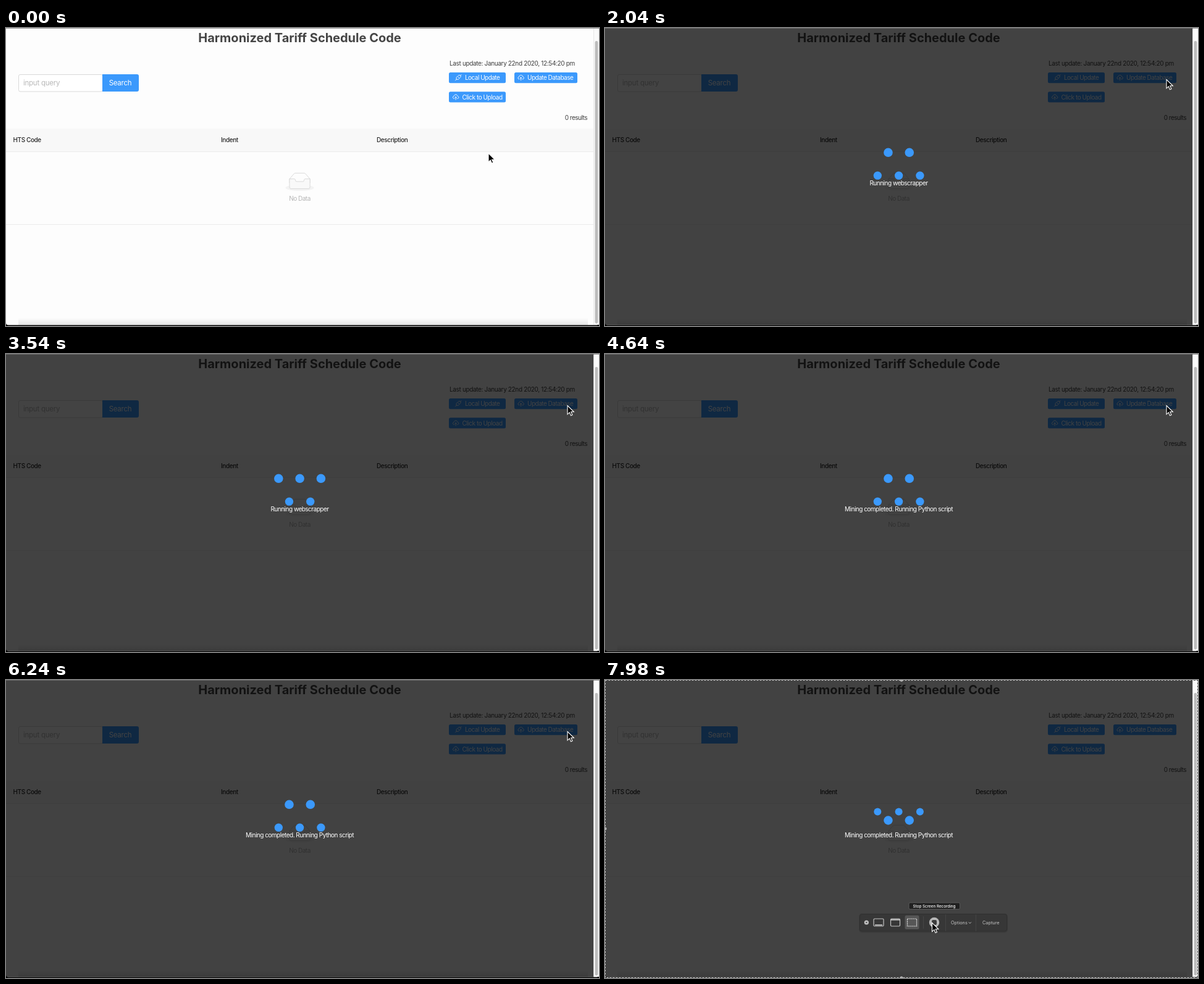
These frames come from a looping animation (960x483 px, 8000 ms). An HTML page:

```html
<!DOCTYPE html>
<html lang="en">
<head>
<meta charset="utf-8">
<title>Tariff schedule search</title>
<style>
  html, body { margin: 0; width: 100%; height: 100%; overflow: hidden; background: #fdfdfd; }
  svg { display: block; width: 100%; height: 100%; }
  text { font: 10px Inter, "Open Sans", sans-serif; letter-spacing: -.5px; fill: #3d3d3d; white-space: pre; }
  .title { font-size: 20px; font-weight: 700; letter-spacing: 0; fill: #454545; }
  .head { font-weight: 500; letter-spacing: -.4px; fill: #262626; }
  .field { font-size: 11.5px; letter-spacing: -.25px; fill: #b9b9b9; }
  .white, .button text { fill: #fff; }
  .button rect { fill: #3b99fc; }
  .icon { fill: none; stroke: #fff; stroke-width: .9; stroke-linecap: round; stroke-linejoin: round; }
  .middle { text-anchor: middle; }
  .end { text-anchor: end; }
  .bar text { font-size: 7.3px; letter-spacing: 0; fill: #c4c4c4; }
  .bar .tip { font-size: 6.3px; font-weight: 500; fill: #fff; }
</style>
</head>
<body>
<svg viewBox="0 0 960 483" preserveAspectRatio="none">
  <defs>
    <linearGradient id="shade" x2="0" y2="1">
      <stop offset="0" stop-color="#000" stop-opacity="0"/>
      <stop offset="1" stop-color="#000" stop-opacity=".1"/>
    </linearGradient>
    <g id="cloud" class="icon">
      <path d="M3 7.6C.3 7.4.2 4 2.4 3.7C3.2.2 8-.1 8.8 3.7C11.2 4 11 7.5 8.2 7.6M5.6 9.2V4.6M4.1 6L5.6 4.5L7.1 6"/>
    </g>
  </defs>

  <rect width="960" height="483" fill="#000"/>
  <path d="M0 0H960V478Q960 481.500 956 481.500H4Q0 481.500 0 478Z" fill="#fdfdfd"/>
  <rect x="20" y="470" width="922" height="11.500" fill="url(#shade)"/>

  <text class="title middle" x="475.500" y="23">Harmonized Tariff Schedule Code</text>
  <text x="718" y="61" style="letter-spacing:-.35px">Last update: January 22nd 2020, 12:54:20 pm</text>
  <rect x="20.500" y="75.500" width="136" height="27.500" rx="2.500" fill="#fff" stroke="#d9d9d9"/>
  <text class="field" x="28" y="93.300">input query</text>
  <g class="button">
    <path d="M156 75H212Q215 75 215 78V100Q215 103 212 103H156Z" fill="#3b99fc"/>
    <text class="field middle" x="185" y="93.300" style="fill:#fff">Search</text>
    <rect x="717" y="72" width="92" height="17.300" rx="2.500"/>
    <path class="icon" d="M727.500 85L729.500 83M729.500 83C727.800 80.500 730 78.800 731 78.300L734 81.300C733 83.500 731 84.300 729.500 83ZM731.800 77.500C733.500 75.600 735.300 76.500 735.800 77C736.500 78 736.500 79.600 734.800 80.800M735.700 77L737 75.700"/>
    <text x="743" y="84.300" style="letter-spacing:-.53px">Local Update</text>
    <rect x="823" y="72" width="102" height="17.300" rx="2.500"/>
    <use href="#cloud" x="828" y="75.500"/>
    <text x="844" y="84.300">Update Database</text>
    <rect x="717" y="103.300" width="92" height="17.300" rx="2.500"/>
    <use href="#cloud" x="722.500" y="107"/>
    <text x="738.500" y="115.600" style="letter-spacing:-.45px">Click to Upload</text>
  </g>
  <text class="end" x="941" y="148.500">0 results</text>

  <rect y="163" width="951" height="37" fill="#f8f8f8"/>
  <path d="M0 200.500H951M0 318.500H951" stroke="#ebebeb"/>
  <text class="head" x="11.500" y="184.500">HTS Code</text>
  <text class="head" x="348" y="184.500">Indent</text>
  <text class="head" x="600" y="184.500">Description</text>
  <g transform="translate(452.500 234.500) scale(.72)" stroke="#d4d4d4" stroke-width="1.200">
    <ellipse cx="32" cy="34" rx="32" ry="7" fill="#f3f3f3" stroke="none"/>
    <path d="M9 14L19.200 2.300Q20.200 1 21.500 1H42.500Q43.800 1 44.800 2.300L55 14V23H9Z" fill="#fdfdfd"/>
    <path d="M9 14H20Q22.400 14.500 22.400 17Q22.400 20 24.600 20H39.400Q41.600 20 41.600 17Q41.600 14.500 44 14H55V32Q55 36 52 36H12Q9 36 9 32Z" fill="#f9f9f9"/>
  </g>
  <text class="middle" x="475.500" y="280" style="fill:#b5b5b5">No Data</text>

  <g id="loading" opacity="0">
    <rect width="951.500" height="481.500" fill="#000" fill-opacity=".737"/>
    <g id="dots" fill="#3b99fc"></g>
    <text id="status" class="white middle" x="475.500" y="255.300"></text>
  </g>

  <path d="M0 .5H960" stroke="#777" stroke-opacity=".75"/>
  <rect x="951.500" y="1" width="8.500" height="480" fill="#fafafa"/>
  <path d="M951.500 1V481" stroke="#e4e4e4" stroke-width=".8"/>
  <rect x="953.500" y="21" width="4.800" height="458" rx="2.400" fill="#bcbcbc"/>

  <g id="capture" class="bar">
    <rect x=".5" y=".5" width="959" height="482" fill="none" stroke="#333"/>
    <rect x=".5" y=".5" width="959" height="482" fill="none" stroke="#ccc" stroke-dasharray="3 2"/>
    <g fill="#aaa" stroke="#eee" stroke-width=".6">
      <circle cx="480" cy="0" r="2.200"/><circle cx="480" cy="483" r="2.200"/>
      <circle cx="0" cy="241" r="2.200"/><circle cx="960" cy="241" r="2.200"/>
    </g>
    <rect x="411" y="378.500" width="241" height="31" rx="5" fill="#000" fill-opacity=".13"/>
    <rect x="412.500" y="379.500" width="238" height="27.500" rx="3.500" fill="#373737" stroke="#303030"/>
    <circle cx="423.300" cy="393" r="3.600" fill="#c8c8c8"/>
    <path d="M422 391.700L424.600 394.300M424.600 391.700L422 394.300" stroke="#373737"/>
    <rect x="485.500" y="381.500" width="23" height="22.500" rx="2.500" fill="#565656"/>
    <g fill="none" stroke="#c4c4c4" stroke-width="1.200">
      <rect x="435" y="387" width="16" height="12" rx="1.500"/>
      <path d="M437 397.200H449" stroke-width="1.800"/>
      <rect x="462.500" y="387" width="15" height="12" rx="1.500"/>
      <path d="M463 388.500H477" stroke-width="2.200"/>
      <rect x="489.500" y="387" width="15" height="12" stroke="#eee" stroke-dasharray="2 1.200"/>
    </g>
    <path d="M515.500 383V403M551.500 380V407M600.500 380V407" stroke="#4a4a4a" stroke-width=".8"/>
    <circle cx="533" cy="393" r="8.200" fill="#b8b8b8"/>
    <rect x="529" y="389" width="8" height="8" rx="2" fill="#3c3c3c"/>
    <text x="560" y="395.700">Options</text>
    <path d="M588.800 392.500L590.800 394.500L592.800 392.500" fill="none" stroke="#c4c4c4"/>
    <text x="611" y="395.700">Capture</text>
    <g id="tooltip">
      <rect x="492" y="361" width="82.500" height="10.500" rx="2" fill="#202020" stroke="#686868" stroke-width=".7"/>
      <text class="tip middle" x="533" y="368.500">Stop Screen Recording</text>
    </g>
  </g>

  <path id="cursor" d="M0 0V14.300L3.300 11.200L5.500 16.300L7.900 15.300L5.700 10.300H10.300Z" stroke="#fff" stroke-width="1.100"/>
</svg>
<script>
const LOOP = 8000, STEP = 20;
const LOADING_AT = 393, FADE = 100, PYTHON_AT = 3800, CAPTURE_AT = 6420, TOOLTIP_AT = 7720;
const RISE = 21.5, DOT_RADIUS = 7.2, DOT_Y = 220.5, CYCLE = 200;

// Quarter steps of the spinner: [vertical offset, scale]
const OUTER = [[0, .4], [1, 1], [0, 1.1], [-1, 1], [0, .75]];
const INNER = [[0, 1.1], [-1, 1], [0, .4], [1, 1], [0, 1]];
// Pointer stops: [time, x, y]
const POINTER = [[0, 781, 203], [280, 909, 83.500], [6660, 909, 83.500], [6940, 930, 300],
  [7120, 800, 436], [7380, 540, 400], [7600, 529.500, 393.500], [8000, 529.500, 393.500]];

const byId = id => document.getElementById(id);
const [loading, dots, status, capture, tooltip, cursor] =
  ["loading", "dots", "status", "capture", "tooltip", "cursor"].map(byId);
const clamp = v => Math.max(0, Math.min(1, v));
const mix = (a, b, k) => a + (b - a) * k;
const smooth = k => k * k * (3 - 2 * k);
const show = (el, on) => el.setAttribute("visibility", on ? "visible" : "hidden");

const circles = Array.from({ length: 5 }, (_, i) => {
  const dot = document.createElementNS("http://www.w3.org/2000/svg", "circle");
  dot.setAttribute("cx", 441.3 + 17.15 * i);
  return dots.appendChild(dot);
});

// cubic-bezier(.15, .46, .9, .6), solved by bisection
function ease(x) {
  const curve = (s, a, b) => 3 * (1 - s) ** 2 * s * a + 3 * (1 - s) * s * s * b + s ** 3;
  let low = 0, high = 1;
  for (let i = 0; i < 24; i++) {
    const s = (low + high) / 2;
    if (curve(s, .15, .9) < x) low = s; else high = s;
  }
  return curve(low, .46, .6);
}

function drawDots(t) {
  const quarter = ((t - LOADING_AT + CYCLE * 2) % CYCLE) / CYCLE * 4;
  const n = Math.floor(quarter), k = ease(quarter - n);
  circles.forEach((dot, i) => {
    const steps = i % 2 ? INNER : OUTER;
    const [y, scale] = steps[n].map((v, j) => mix(v, steps[n + 1][j], k));
    dot.setAttribute("cy", DOT_Y + RISE * y);
    dot.setAttribute("r", DOT_RADIUS * scale);
  });
}

function drawPointer(t) {
  const i = POINTER.findIndex(stop => stop[0] > t);
  const [t0, x0, y0] = POINTER[i - 1], [t1, x1, y1] = POINTER[i];
  const k = smooth((t - t0) / (t1 - t0));
  cursor.setAttribute("transform", `translate(${mix(x0, x1, k)} ${mix(y0, y1, k)})`);
}

function draw(t) {
  loading.setAttribute("opacity", clamp((t - LOADING_AT) / FADE));
  status.textContent = t < PYTHON_AT ? "Running webscrapper" : "Mining completed. Running Python script";
  show(capture, t >= CAPTURE_AT);
  show(tooltip, t >= TOOLTIP_AT);
  drawDots(t);
  drawPointer(t);
}

const start = performance.now();
function tick() {
  const t = (performance.now() - start) % LOOP;
  draw(Math.floor((t + .5) / STEP) * STEP % LOOP);
  requestAnimationFrame(tick);
}
tick();
</script>
</body>
</html>
```
